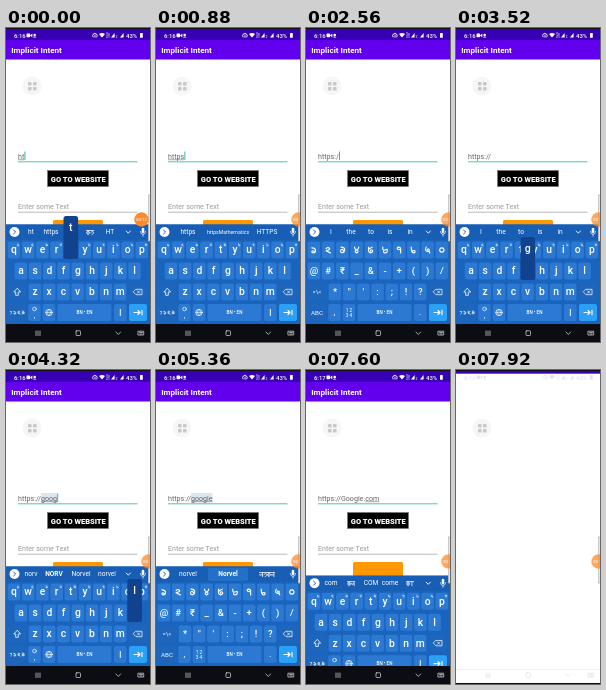
Write an HTML page that moves like this. It is 144 by 314 pixels and loops after 8000 ms.

```html
<!DOCTYPE html>
<html lang="en">
<head>
<meta charset="utf-8">
<title>Implicit Intent</title>
<style>
html, body { margin: 0; width: 100%; height: 100%; overflow: hidden; background: #fff; }
svg { display: block; width: 100%; height: 100%; font-family: Roboto, "Noto Sans", sans-serif; }
.line { fill: none; stroke: #fff; stroke-linecap: round; stroke-linejoin: round; }
</style>
</head>
<body>
<svg id="stage" viewBox="0 0 144 314"></svg>
<script>
const LOOP = 8000;
const stage = document.getElementById('stage');

// Strokes of Bengali digits and letters, in a box of about 8 by 8 around 0,0
const digits = [
  'M0-3a3 3 0 1 0 .1 0z',
  'M-3-3Q2-3 2 1Q2 4-1 4Q-3 4-3 2Q-2 0 0 2',
  'M-3-2Q0-5 2-2Q2 0-3 1L3 4',
  'M-2-4Q4-4 3 1Q2 5-2 3Q-4 0 0-1L2 2',
  'M-3-4Q-3-1 0 0Q4 2 0 4Q-4 2 0 0Q3-1 3-4',
  'M-3-4Q-4 4 0 4Q4 3 2 0Q-1-1 0 2M-3-1L2-4',
  'M-3-4Q-4 1 0 0L3-1Q4 4 0 4Q-2 4-2 2',
  'M2 4V-1Q2-4-1-4Q-4-3-2-1Q0 0 2-1',
  'M-3-4Q-3 4 0 4Q3 4 2 1Q0 0-2 2',
  'M-2-4Q-4 2 0 2Q3 2 2-1Q0-2 0 0M2 2L3 4'
];
const letters = {
  k: 'M-3-3H3M0-3V4M0-2L-3 1L0 3M0-1Q4-2 2 2',
  t: 'M-3-3H3M-2 1Q0-4 3 0Q3 3 0 4',
  l: 'M-3-3H3M2-3V4M-3 1Q-2-2-1 2Q0-2 2 1',
  a: 'M-3-3H3M0-3V4'
};

const rect = (x, y, w, h, fill, r = 0, more = '') =>
  `<rect x="${x}" y="${y}" width="${w}" height="${h}" rx="${r}" fill="${fill}" ${more}/>`;
const esc = s => s.replace(/&/g, '&amp;').replace(/</g, '&lt;');
const text = (x, y, s, size, fill = '#fff', more = '') =>
  `<text x="${x}" y="${y}" font-size="${size}" fill="${fill}" ${more}>${esc(s)}</text>`;
const mid = (x, y, s, size, more = '') => text(x, y, s, size, '#fff', 'text-anchor="middle" ' + more);
const line = (d, width = .9, color = '#fff', more = '') =>
  `<path class="line" d="${d}" stroke-width="${width}" style="stroke:${color}" ${more}/>`;
const glyph = (d, x, y, k, width = 1.2) =>
  line(d, width, '#fff', `transform="translate(${x} ${y}) scale(${k})"`);

// Keyboard
const KEY = '#2b79d2', DARK_KEY = '#1e66bb';
const rowY = [222, 243, 264, 284.5];
const y4 = rowY[3];
const spots = {};
const key = (x, y, w = 12.6, fill = KEY) => rect(x - w / 2, y - 8.5, w, 17, fill, 2);

function row(chars, x0, y, size) {
  return [...chars].map((c, i) => {
    const x = x0 + i * 14.2;
    spots[c] = [x, y];
    return key(x, y) + mid(x, y + 3.4, c, size, 'font-weight="500"');
  }).join('');
}

function bottomRow(left, second, third, dot) {
  return key(11, y4, 19, DARK_KEY) + left + key(28.5, y4) + second + key(43, y4) + third +
    key(78.5, y4, 54) + mid(78.5, y4 + 1.7, 'BN • EN', 4.6, 'font-weight="500"') +
    key(114.3, y4) + dot + key(132, y4, 18, '#2ba0f5') +
    line(`M128 ${y4}H134M132 ${y4 - 2}L134 ${y4}L132 ${y4 + 2}M136 ${y4 - 2.3}V${y4 + 2.3}`, 1.1);
}

const backspace = key(132, rowY[2], 18, DARK_KEY) +
  line('M130 261.3H136V266.7H130L127.5 264ZM131.4 262.8L133.8 265.2M133.8 262.8L131.4 265.2', .7);

const letterKeys =
  row('qwertyuiop', 8, rowY[0], 10.3) +
  digits.map((d, i) => glyph(digits[(i + 1) % 10], 12.2 + i * 14.2, 217, .27, 2)).join('') +
  row('asdfghjkl', 15, rowY[1], 10.3) +
  key(11, rowY[2], 19, DARK_KEY) + line('M11 260.5L7.8 264H9.7V267.3H12.3V264H14.2Z', .8) +
  row('zxcvbnm', 29, rowY[2], 10.3) + backspace +
  bottomRow(
    mid(5, y4 + 2.5, '?', 6.2) + [1, 2, 3].map(n => glyph(digits[n], 5 + n * 4, y4, .4, 1.8)).join(''),
    '<circle class="line" cx="28.5" cy="281" r="1.8" stroke-width=".7"/>' + mid(28.5, 290, ',', 8),
    `<circle class="line" cx="43" cy="${y4}" r="3.2" stroke-width=".7"/>` +
      line(`M39.8 ${y4}H46.2M43 ${y4 - 3.2}q-3 3.2 0 6.4q3-3.2 0-6.4`, .6),
    line(`M114.3 ${y4 - 3}v6`, 1));

const symbolKeys =
  digits.map((d, i) => {
    const x = 8 + i * 14.2;
    return key(x, rowY[0]) + glyph(digits[(i + 1) % 10], x, rowY[0], .72, 1.6);
  }).join('') +
  row('@#₹_&-+()/', 8, rowY[1], 9.5) +
  key(11, rowY[2], 19, DARK_KEY) + mid(11, 266.3, '=\\<', 6) +
  row('*"\':;!?', 29, rowY[2], 9.5) + backspace +
  bottomRow(mid(11, y4 + 2.3, 'ABC', 6.2), mid(28.5, y4 + 2.5, ',', 9),
    mid(43, y4 - .5, '1 2', 4.8) + mid(43, y4 + 4.8, '3 4', 4.8), mid(114.3, y4 + 2.5, '.', 9));
spots['.'] = [114.3, y4];

const mic = rect(135.7, 199.7, 2.6, 5.3, '#fff', 1.3) +
  line('M134.4 203.5Q134.6 206.3 137 206.3Q139.4 206.3 139.6 203.5M137 206.3V208.2', .7);
const opener = '<circle cx="8.5" cy="204" r="5" fill="#fff"/>' + line('M7.6 202L9.6 204L7.6 206', 1, '#1b5fb4');

const navIcons = color => [
  'M30 303V307.5M32 303V307.5M34 303V307.5',
  'M70.7 302.8H73.8Q74.5 302.8 74.5 303.5V306.8Q74.5 307.5 73.8 307.5H70.7Q70 307.5 70 306.8V303.5Q70 302.8 70.7 302.8Z',
  'M110 304L112.3 306.5L114.6 304',
  'M132.3 303.2H137.7V307H132.3ZM133.5 304.5H136.5M134 306H136'
].map(d => line(d, .8, color)).join('');

const statusIcons = (color, attrs = '') =>
  text(8, 9.6, '6:16', 5.9, color, `font-weight="500" ${attrs}`) +
  rect(20.5, 5.6, 3.6, 3.6, color, .8) + `<path d="M24 7.4L26.3 5.6V9.2Z" fill="${color}"/>` +
  `<circle cx="28.7" cy="7" r="1.3" fill="${color}"/><path d="M26.8 9.6Q28.7 7.4 30.6 9.6Z" fill="${color}"/>` +
  line('M87 9A2.3 2.3 0 1 1 90.8 9M89 7V9.2', .9, color) +
  `<path d="M93 6Q96 3.8 99 6L96 9.6Z" fill="${color}"/>` +
  text(100, 7.2, 'Vo', 3.2, color) + text(100, 9.8, 'LTE', 2.6, color) +
  `<path d="M105 9.6L108.6 5V9.6ZM114 9.6L117.6 5V9.6Z" fill="${color}"/>` +
  text(109.6, 9.6, '2', 3.6, color) +
  text(120, 9.6, '43%', 6, color, 'font-weight="500"') + rect(134, 5, 2.8, 4.8, color, .6);

stage.innerHTML =
  rect(0, 0, 144, 314, '#fff') +
  rect(0, 0, 144, 12, '#3700b3') + rect(0, 12, 144, 19.5, '#6200ee') +
  statusIcons('#fff', 'id="clock"') +
  text(5.2, 25, 'Implicit Intent', 8.1, '#fff', 'font-weight="700"') +
  rect(0, 123, 34, 9, '#dce6f2', 0, 'id="mark"') +
  text(12, 130.5, '', 7.1, '#666', 'id="field" xml:space="preserve"') +
  rect(12, 131.6, 0, .5, '#555', 0, 'id="under"') +
  rect(12, 123.5, .8, 8.5, '#03a893', 0, 'id="caret"') +
  rect(12, 133.3, 119.5, 1, '#45c9ba') +
  rect(41.5, 142.5, 61, 16, '#000', 0, 'id="go" stroke="#777" stroke-width=".7"') +
  mid(72.3, 153.5, 'GO TO WEBSITE', 7.5, 'font-weight="800"') +
  text(12, 180.8, 'Enter some Text', 7.1, '#9a9a9a') + rect(12, 183.8, 119.5, .7, '#9c9c9c') +
  rect(47, 192, 50, 17, '#ff9800', 1.5) +
  `<g id="page">${rect(0, 0, 144, 314, '#fff')}</g>` +
  `<g id="board">${rect(0, 196.5, 144, 99.5, '#1a64bd')}${rect(0, 196.5, 144, 15.5, '#195eb5')}
    ${opener}${mic}<g id="chips"></g><g id="abc">${letterKeys}</g><g id="sym">${symbolKeys}</g>
    <g id="popup">${rect(-7.3, 0, 14.6, 43, '#11428d', 2.5)}${mid(0, 15, '', 10.5, 'id="big" font-weight="500"')}</g></g>` +
  rect(0, 296, 144, 18, '#0b0d12') + navIcons('#c8c8c8') +
  `<g id="light">${rect(0, 296, 144, 17, '#fff')}${rect(0, 299, 144, .8, '#eee')}${navIcons('#e4e4e4')}</g>` +
  `<g id="ghost">${statusIcons('#e6e1f0')}</g>` +
  rect(0, 0, 144, 1, '#111') +
  '<circle cx="26" cy="58" r="9.5" fill="#f6f6f6"/>' +
  [22, 27].map(x => [54, 59].map(y => rect(x, y, 3.6, 3.6, '#c9c9c9', .8)).join('')).join('') +
  rect(142.4, 167, 1.6, 46, '#fff', 0, 'stroke="#b5b5b5" stroke-width=".7"') +
  `<g id="bubble"><circle r="7.2" fill="#ff8a2b"/>${mid(0, 1.6, '00:12', 4.4)}</g>`;

const el = Object.fromEntries([...stage.querySelectorAll('[id]')].map(n => [n.id, n]));

// [press time, key, text after release]
const HOLD = 140;
const presses = [
  [0, 't', 'htt'], [280, 'p', 'http'], [560, 's', 'https'],
  [1960, ':', 'https:'], [2280, '/', 'https:/'], [2600, '/', 'https://'],
  [3440, 'g', 'https://g'], [3640, 'o', 'https://go'], [3860, 'o', 'https://goo'],
  [4060, 'g', 'https://goog'], [4260, 'l', 'https://googl'], [4520, 'e', 'https://google'],
  [5560, '.', 'https://Google.'], [6020, 'c', 'https://Google.c'],
  [6280, 'o', 'https://Google.co'], [6520, 'm', 'https://Google.com']
];
const symbolTimes = [[1200, 3120], [4960, 5820]];

// Suggestions from a time on: ~ marks Bengali strokes, * the preferred word
const five = [25, 45, 65, 84, 104], three = [32, 72, 111];
const suggestions = [
  [0, five, 'ht https hit ~kt HT'],
  [420, five, 'http https ~tk to HTTP'],
  [700, three, 'https httpsMathematics HTTPS'],
  [2100, five, 'I the to is in'],
  [3580, five, 'g go good ~ta G'],
  [4200, [25, 48, 75, 101], 'norv *NORV Norvel norvel'],
  [4660, three, 'norvel *Norvel ~ltkl'],
  [5700, five, 'I the to is in'],
  [6160, five, 'c ~k C can ~t'],
  [6420, five, 'co ~ka CO ~kt ~ta'],
  [6660, five, 'com ~kl COM come ~ka']
];

function chip(word, x, wide) {
  const name = word.slice(1);
  if (word[0] === '~') {
    return [...name].map((c, i) =>
      glyph(letters[c], x + (i - (name.length - 1) / 2) * 3.8, 204.3, .6, 1.2)).join('');
  }
  if (word[0] === '*') {
    return (wide ? rect(x - 20, 198, 40, 13, '#2370cb', 2) : '') + mid(x, 206.3, name, 6.6, 'font-weight="700"');
  }
  return mid(x, 206.3, word, word.length > 10 ? 5.2 : 6.6);
}

function chipRow([, xs, words]) {
  const wide = xs === three;
  return words.split(' ').map((w, i) => chip(w, xs[i], wide)).join('') +
    (wide ? '' : line('M120.2 203L122.3 205.2L124.4 203'));
}

const show = (node, on) => node.setAttribute('visibility', on ? 'inherit' : 'hidden');
const set = (node, attrs) => { for (const k in attrs) node.setAttribute(k, attrs[k]); };
const ramp = (t, a, b) => Math.min(1, Math.max(0, (t - a) / (b - a)));
const ease = p => p * p * (3 - 2 * p);
let shownChips;

function draw(t) {
  const done = presses.filter(p => t >= p[0] + HOLD).pop();
  const value = done ? done[2] : 'ht';
  const since = t - (done ? done[0] + HOLD : 0);
  el.clock.textContent = t < 5900 ? '6:16' : '6:17';

  el.field.textContent = value;
  const end = 12 + el.field.getComputedTextLength();
  const word = /[a-z]+$/i.exec(value);
  const from = !word ? end : word.index ? 12 + el.field.getSubStringLength(0, word.index) : 12;
  set(el.under, { x: from, width: end - from });
  set(el.mark, { x: from, width: end - from });
  show(el.mark, /goog/.test(value));
  set(el.caret, { x: end + .3 });
  show(el.caret, since % 1000 < 500);

  const symbols = symbolTimes.some(([a, b]) => t >= a && t < b);
  show(el.sym, symbols);
  show(el.abc, !symbols);

  const held = presses.find(p => t >= p[0] && t < p[0] + HOLD);
  show(el.popup, held);
  if (held) {
    const [x, y] = spots[held[1]];
    el.big.textContent = held[1];
    set(el.popup, { transform: `translate(${x} ${y - 34})` });
  }

  const current = suggestions.filter(s => t >= s[0]).pop();
  if (current !== shownChips) {
    shownChips = current;
    el.chips.innerHTML = chipRow(current);
  }

  const away = ease(ramp(t, 400, 800));
  set(el.bubble, { transform: `translate(${135.5 + 7 * away} 191.5)`, opacity: 1 - .25 * away });

  // Tap, keyboard leaves, then the new page is uncovered from the bottom up
  set(el.go, { fill: t >= 7360 && t < 7520 ? '#3a3a3a' : '#000' });
  set(el.board, { transform: `translate(0 ${118 * ease(ramp(t, 7560, 7800))})` });
  const top = 301 * (1 - ramp(t, 7700, 8125)) ** 6;
  set(el.page, { transform: `translate(0 ${top})` });
  show(el.page, t >= 7700);
  show(el.ghost, t >= 7700 && top < 12);
  set(el.light, { opacity: ramp(t, 7700, 7860) });
}

function tick(now) {
  draw(now % LOOP);
  requestAnimationFrame(tick);
}
draw(0);
requestAnimationFrame(tick);
</script>
</body>
</html>
```
